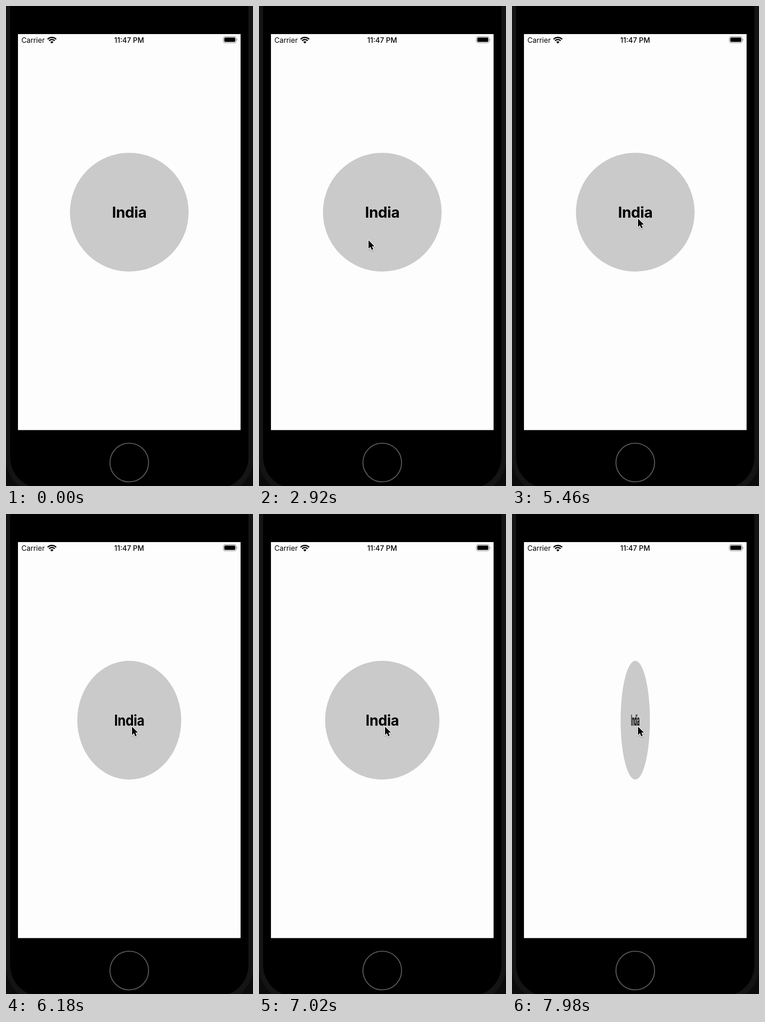
An HTML page for the animation above (8000 ms loop, 537 by 1043 pixels).

```html
<!DOCTYPE html>
<html lang="en">
<head>
<meta charset="utf-8">
<title>Flip card</title>
<style>
  html, body { margin: 0; width: 100%; height: 100%; overflow: hidden; background: #0b0b0b; }
  svg { display: block; width: 100vw; height: 100vh; }
  text { font-family: Inter, "Liberation Sans", sans-serif; }
</style>
</head>
<body>
<svg viewBox="0 0 537 1043">
  <defs>
    <filter id="shadow" x="-50%" y="-50%" width="200%" height="200%">
      <feDropShadow dx="0" dy="1.2" stdDeviation="1.1" flood-opacity=".35"/>
    </filter>
    <clipPath id="wedge"><path d="M99.7 81.5 L86.5 68.3 V60 H113 V68.3 Z"/></clipPath>
  </defs>

  <!-- phone -->
  <rect x="-1" y="-100" width="539" height="1160" rx="78" fill="#141414"/>
  <rect x="9" y="-100" width="518" height="1148" rx="68" fill="#000"/>
  <rect x="26" y="61" width="484" height="860.5" fill="#fdfdfd"/>
  <circle cx="268" cy="992" r="42" fill="none" stroke="#55565a" stroke-width="2.2"/>

  <!-- status bar -->
  <text x="33.5" y="79.6" font-size="15.5">Carrier</text>
  <text x="267.7" y="79.6" font-size="15.5" font-weight="500" text-anchor="middle">11:47 PM</text>
  <g clip-path="url(#wedge)" fill="none" stroke="#000" stroke-width="2.8">
    <circle cx="99.7" cy="81.5" r="13.2"/>
    <circle cx="99.7" cy="81.5" r="8.6"/>
    <circle cx="99.7" cy="81.5" r="2.4" stroke-width="4.8"/>
  </g>
  <rect x="472.5" y="66.7" width="28" height="13.2" rx="3.8" fill="none" stroke="#8c8c8c" stroke-width="1.2"/>
  <rect x="474.5" y="68.6" width="24" height="9.4" rx="2.2"/>
  <path d="M501.8 71.2 a2.2 2.4 0 0 1 0 4.4 Z" fill="#8c8c8c"/>

  <g id="card">
    <circle r="129" fill="#cacacb"/>
    <text id="label" y="11.8" font-size="32.3" font-weight="700" letter-spacing="-.4" text-anchor="middle">India</text>
  </g>

  <g id="cursor" filter="url(#shadow)">
    <path d="M0 0 V18.2 L4.1 14.3 L7 21 L10.2 19.6 L7.4 13.1 H13 Z"
      stroke="#fff" stroke-width="2.6" stroke-linejoin="round" paint-order="stroke"/>
  </g>
</svg>
<script>
const LOOP = 8000;
const FLIP = 540;                    // length of one half turn
const HOLD = [429, 529];             // the turn pauses shortly before it lands
const taps = [6031, 6591, 7736];
const names = ["India", "Pakistan"];

// pointer legs: start, end, from, to
const legs = [
  [1820, 2540, [35, 612], [195, 533]],
  [2640, 3100, [195, 533], [260, 497]],
  [4060, 4320, [260, 497], [263.5, 490]],
  [4600, 5160, [263.5, 490], [274, 462]]
];

const [card, label, cursor] = ["card", "label", "cursor"].map(id => document.getElementById(id));
const clamp = v => Math.min(1, Math.max(0, v));
const mix = (a, b, k) => a + (b - a) * k;
const easeOut = k => 1 - (1 - k) ** 6;
const smooth = k => k * k * (3 - 2 * k);

// cubic-bezier(.42, 0, .58, 1), solved by bisection
function easeInOut(x) {
  let lo = 0, hi = 1;
  for (let i = 0; i < 24; i++) {
    const s = (lo + hi) / 2, r = 1 - s;
    const bx = 1.26 * s * r * r + 1.74 * s * s * r + s ** 3;
    if (bx < x) lo = s; else hi = s;
  }
  return smooth(lo);
}

function drawCard(t) {
  const turn = taps.findLastIndex(start => t >= start);
  let p = 0;
  if (turn >= 0) {
    let age = t - taps[turn];
    if (age > HOLD[0] && age < HOLD[1]) age = HOLD[0];
    p = easeInOut(clamp(age / FLIP));
  }
  const face = Math.max(0, turn + (p > 0.5 ? 1 : 0)) % 2;
  const width = Math.max(0.004, Math.abs(Math.cos(p * Math.PI)));
  card.setAttribute("transform", `translate(268 448) scale(${width} 1)`);
  label.textContent = names[face];
  label.setAttribute("opacity", face && turn === 0 ? p ** 1.5 : 1);
}

function drawCursor(t) {
  const leg = legs.findLast(l => t >= l[0]);
  cursor.setAttribute("visibility", leg ? "visible" : "hidden");
  if (!leg) return;
  const [start, end, from, to] = leg;
  const k = clamp((t - start) / (end - start));
  const e = leg === legs[0] ? easeOut(k) : smooth(k);
  cursor.setAttribute("transform", `translate(${mix(from[0], to[0], e)} ${mix(from[1], to[1], e)})`);
}

function render(t) {
  drawCard(t);
  drawCursor(t);
}

const began = performance.now();
function tick() {
  render((performance.now() - began) % LOOP);
  requestAnimationFrame(tick);
}
tick();
</script>
</body>
</html>
```
